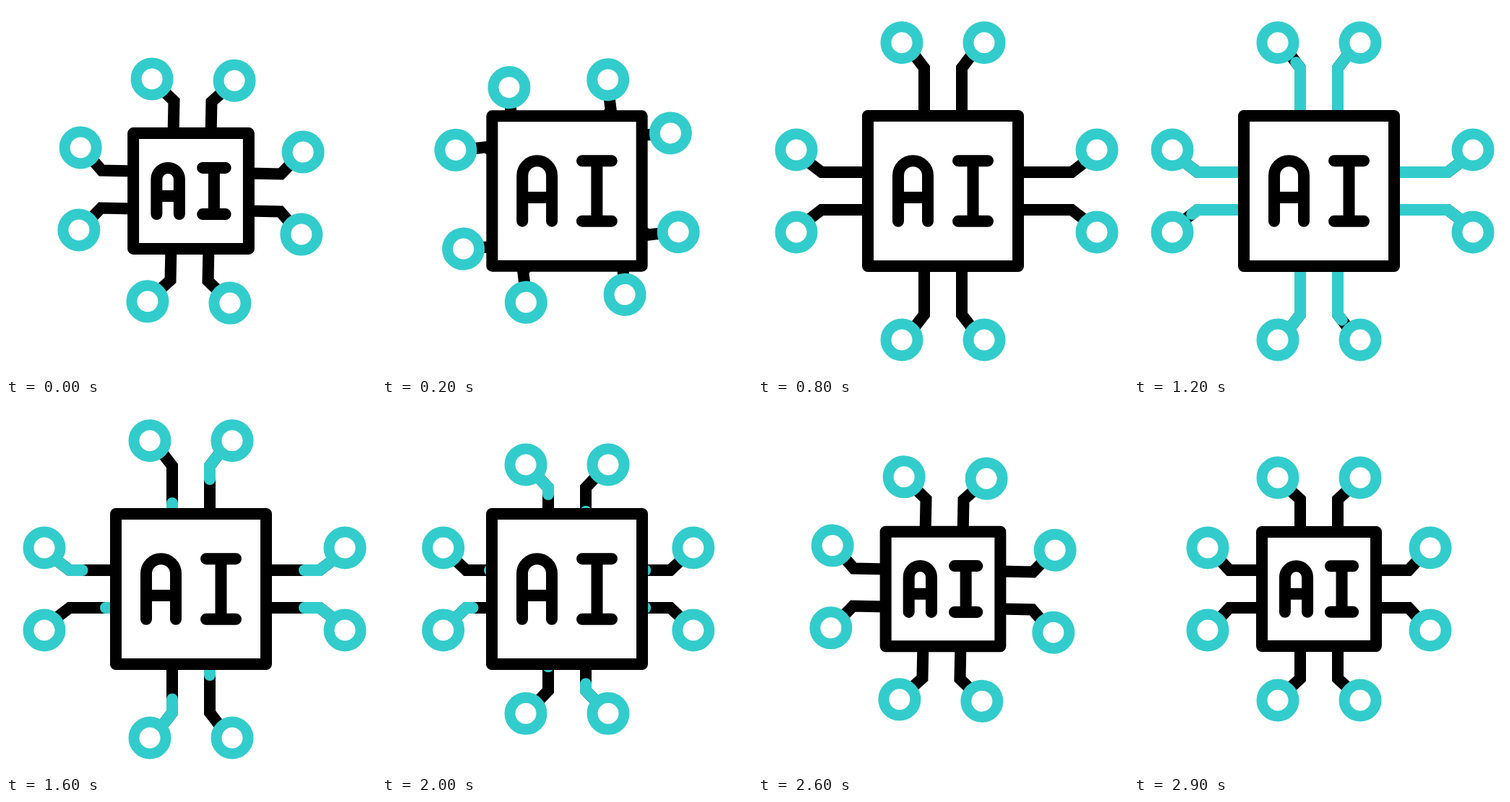
Recreate the animation shown at these times as an HTML page. Size 512x512 px, loop 3000 ms.

```html
<!DOCTYPE html>
<html lang="en">
<head>
<meta charset="utf-8">
<title>AI chip</title>
<style>
  html, body { margin: 0; width: 100%; height: 100%; overflow: hidden; background: #fff; }
  svg { display: block; width: 100%; height: 100%; }
  path { fill: none; stroke: #000; stroke-width: 16; }
  circle { fill: #fff; stroke: #3cc; stroke-width: 15; }
  .pulse { stroke: #3cc; stroke-linecap: round; }
  #box { fill: #fff; stroke-linejoin: round; }
  #label { stroke-linecap: round; }
</style>
</head>
<body>
<svg viewBox="-256 -256 512 512">
  <g id="pins"></g>
  <path id="box"/>
  <path id="label"/>
</svg>
<script>
const LOOP = 3000, STEP = 100, LEAD = 100 / 3;
const REST = 154, REACH = [51.3, 59, 52, 49]; // top, right, bottom, left

const $ = id => document.getElementById(id);
const mix = (a, b, k) => a + (b - a) * k;

// Eased progress between two times
function ease(t, from, to) {
  const u = Math.min(1, Math.max(0, (t - from) / (to - from)));
  return u * u * (3 - 2 * u);
}

function add(parent, tag, attrs) {
  const el = document.createElementNS(parent.namespaceURI, tag);
  for (const k in attrs) el.setAttribute(k, attrs[k]);
  return parent.appendChild(el);
}

const pins = [];
for (let side = 0; side < 4; side++) {
  for (const m of [-1, 1]) {
    const g = add($('pins'), 'g', { transform: `rotate(${side * 90})` });
    pins.push({
      side, m,
      inward: m > 0 || side === 1,
      line: add(g, 'path', {}),
      pulse: add(g, 'path', { class: 'pulse', pathLength: 1 }),
      ring: add(g, 'circle', { r: 22, cx: 57 * m })
    });
  }
}

function drawPin(p, out, grow, shrink, back) {
  const r = REST + REACH[p.side] * out;
  const d = `M${39 * p.m} ${18 - r}L${26 * p.m} ${mix(30, 35, out) - r}V-79`;
  p.line.setAttribute('d', d);
  p.pulse.setAttribute('d', d);
  p.ring.setAttribute('cy', -r);

  const len = grow - shrink;
  const start = p.inward === back ? shrink : 1 - grow;
  p.pulse.style.visibility = len > 0.001 ? 'visible' : 'hidden';
  p.pulse.style.strokeDasharray = `${len} 2`;
  p.pulse.style.strokeDashoffset = -start;
}

function drawChip(h) {
  $('box').setAttribute('d', `M${-h} ${-h}H${h}V${h}H${-h}Z`);
  const n = v => v * h / 104;
  const [far, near, y, r, bar] = [62, 21, 41.8, 20.5, 9].map(n);
  $('label').setAttribute('d',
    `M${-far} ${y}V${r - y}A${r} ${r} 0 0 1 ${-near} ${r - y}V${y}M${-far} ${bar}H${-near}` +
    `M${near} ${-y}H${far}M${near} ${y}H${far}M${(near + far) / 2} ${-y}V${y}`);
}

function draw(t) {
  const turn = 90 * (ease(t, 0, 500) - ease(t, 2167, 2667) - 1);
  $('pins').setAttribute('transform', `rotate(${turn})`);

  const out = ease(t, 500, 833) - ease(t, 1833, 2167);
  const back = t >= 1500;
  const t0 = back ? 1500 : 833;
  const grow = ease(t, t0, t0 + 333);
  const shrink = ease(t, t0 + 333, t0 + 667);
  for (const p of pins) drawPin(p, out, grow, shrink, back);

  drawChip(79 + 31.4 * ease(t, 0, 333) - 6.4 * ease(t, 333, 667) - 25 * ease(t, 2167, 2667));
}

const begin = performance.now();
function tick() {
  const t = (performance.now() - begin) % LOOP;
  draw(Math.floor(t / STEP) * STEP + LEAD); // ten poses a second
  requestAnimationFrame(tick);
}
tick();
</script>
</body>
</html>
```
